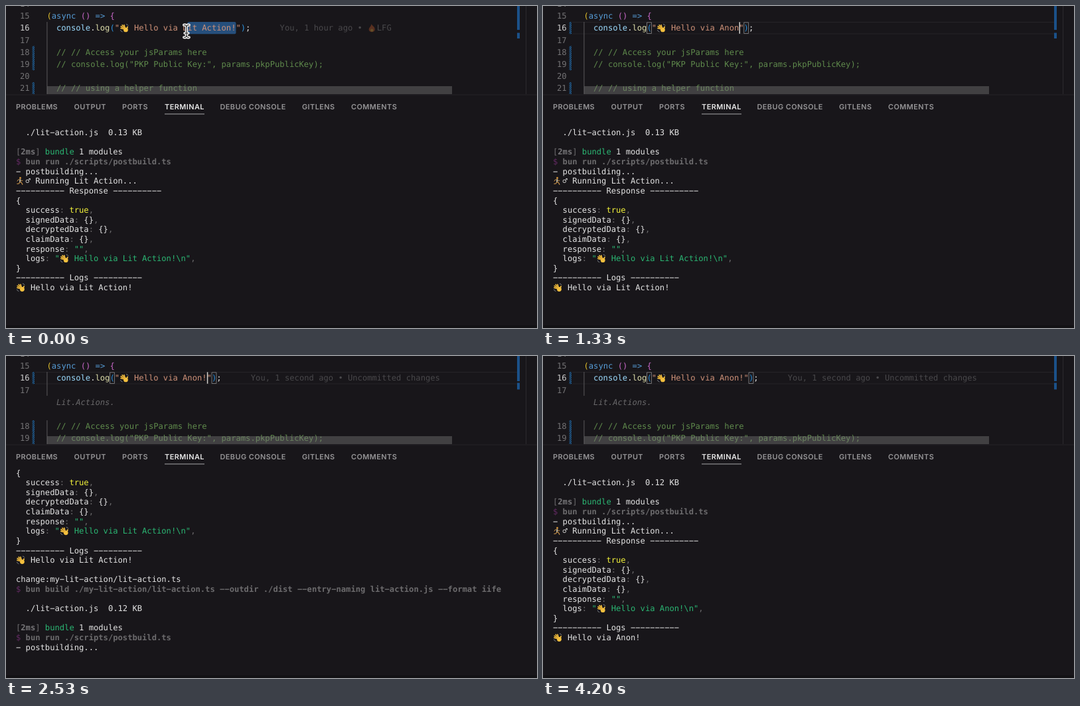
An HTML page with a canvas that plays this animation: 800 px wide and 486 px high, repeating every 4.27 s.

```html
<!DOCTYPE html>
<html lang="en">
<head>
<meta charset="utf-8">
<style>
  html, body { margin: 0; width: 100%; height: 100%; overflow: hidden; background: #18161a; }
  canvas { display: block; }
</style>
</head>
<body>
<canvas id="stage" width="800" height="486"></canvas>
<script>
const ctx = document.getElementById('stage').getContext('2d');
const LOOP = 4270, CELL = 7.31, ROW = 14.61, LINE = 18.2;
const MONO = '12.14px "DejaVu Sans Mono", monospace';
const BG = '#18161a', WHITE = '#e4e4e4', DIM = '#6c6b6d', GREEN = '#2bb673', COMMENT = '#5f8a4c';
const BLUE = '#569cd6', PURPLE = '#c868c8', STRING = '#ce9178', PAREN = '#2c93e0', BLAME = '#49484b';

function rect(x, y, w, h, color) {
  ctx.fillStyle = color;
  ctx.fillRect(x, y, w, h);
}

function stroke(points, width, color) {
  ctx.beginPath();
  points.forEach(([x, y]) => ctx.lineTo(x, y));
  ctx.lineWidth = width;
  ctx.strokeStyle = color;
  ctx.stroke();
}

function dot(x, y, r, color) {
  ctx.beginPath();
  ctx.arc(x, y, r, 0, 7);
  ctx.fillStyle = color;
  ctx.fill();
}

// Small pictograms, each two cells wide
const icons = {
  '👋'() {
    const skin = '#f3bf3e';
    [[1.4, 7], [1.7, 4.3], [3.7, 2.3], [6.4, 2.2]].forEach(tip => stroke([[8.4, 9], tip], 1.7, skin));
    stroke([[9.8, 9.4], [11.6, 5]], 1.8, skin);
    dot(8.9, 9.4, 3.4, skin);
    stroke([[5.8, 8.2], [3.6, 6.4]], .6, '#b57a20');
    stroke([[6.9, 7], [4.9, 4.6]], .6, '#b57a20');
    stroke([[9.6, 1], [11.4, 1.6], [12.4, 3]], .8, '#8b9298');
    stroke([[1, 9.8], [1.8, 11.4], [3.6, 12.4]], .8, '#8b9298');
  },
  '🏃'() {
    stroke([[5.8, 4.8], [5.6, 7.8]], 2, '#aab4b6');
    stroke([[5.2, 4.6], [2.6, 5], [1.6, 6.8]], .9, '#d9a050');
    stroke([[6.4, 4.8], [7.8, 6.8], [9.4, 6]], .9, '#d9a050');
    stroke([[5.8, 8.2], [8, 9.4], [9.4, 12]], 1.1, '#d39a4c');
    stroke([[5.4, 8.2], [4, 10.6], [1.4, 11]], 1.1, '#d39a4c');
    dot(6, 2.2, 1.5, '#d0913a');
  },
  '🔥'() {
    ctx.beginPath();
    ctx.moveTo(6, .5);
    ctx.bezierCurveTo(7, 4, 11, 4, 11, 9);
    ctx.bezierCurveTo(11, 14, 2, 14, 2, 9);
    ctx.bezierCurveTo(2, 6, 5, 5, 6, .5);
    ctx.fillStyle = '#593020';
    ctx.fill();
    dot(6.6, 10.2, 2.1, '#655029');
  }
};

// runs: text, colour, text, colour ...; a leading * in the colour makes it bold, / italic
function write(x, mid, ...runs) {
  for (let i = 0; i < runs.length; i += 2) {
    let color = runs[i + 1], style = '';
    if (color[0] === '*') style = 'bold ';
    if (color[0] === '/') style = 'italic ';
    if (style) color = color.slice(1);
    for (const ch of runs[i]) {
      if (icons[ch]) {
        ctx.save();
        ctx.translate(x + .5, mid - 6.7);
        icons[ch]();
        ctx.restore();
        x += 2 * CELL;
      } else {
        ctx.font = style + MONO;
        ctx.fillStyle = color;
        // The minus sign gives the long hyphen of the look
        ctx.fillText(ch === '-' ? '−' : ch, x, mid + 4.2);
        x += CELL;
      }
    }
  }
}

// Terminal contents
const field = (name, value, color = WHITE) => ['  ' + name, WHITE, ': ', DIM, value, color, ',', DIM];
const plain = text => [text, WHITE];
const command = text => ['$ ', '#642a64', text, '*#6c6b6d'];
const blank = [];
const rule = '-'.repeat(10);

const bundle = size => [
  blank, plain(`  ./lit-action.js  ${size} KB`), blank,
  ['[', DIM, '2ms', '*#777679', '] ', DIM, 'bundle', GREEN, ' 1 modules', WHITE]
];
const post = [command('bun run ./scripts/postbuild.ts'), plain('- postbuilding...')];
const running = [plain('🏃♂ Running Lit Action...')];
const response = name => [
  plain(`${rule} Response ${rule}`),
  plain('{'),
  field('success', 'true', '#f2f23a'),
  field('signedData', '{}'),
  field('decryptedData', '{}'),
  field('claimData', '{}'),
  field('response', '""', GREEN),
  field('logs', `"👋 Hello via ${name}!\\n"`, GREEN),
  plain('}'),
  plain(`${rule} Logs ${rule}`),
  plain(`👋 Hello via ${name}!`),
  blank
];

const output = [
  [0, [...bundle('0.13'), ...post, ...running, ...response('Lit Action')]],
  [1800, [plain('change:my-lit-action/lit-action.ts')]],
  [2200, [command('bun build ./my-lit-action/lit-action.ts --outdir ./dist --entry-naming lit-action.js --format iife'),
          ...bundle('0.12')]],
  [2400, post],
  [3400, running],
  [3470, response('Anon')]
];

function drawTerminal(t) {
  const lines = output.filter(([at]) => t >= at).flatMap(([, rows]) => rows);
  lines.slice(-19).reverse().forEach((runs, i) => write(15, 439.4 - i * ROW, ...runs));
}

const tabs = [['PROBLEMS', 15], ['OUTPUT', 102.5], ['PORTS', 175], ['TERMINAL', 239],
              ['DEBUG CONSOLE', 322.5], ['GITLENS', 446], ['COMMENTS', 520]];

function drawPanel(t) {
  rect(0, 133, 800, 353, BG);
  rect(0, 133.5, 800, 1, '#242226');
  ctx.font = '600 10.9px Inter, sans-serif';
  ctx.letterSpacing = '0.45px';
  for (const [name, x] of tabs) {
    ctx.fillStyle = name === 'TERMINAL' ? '#e7e7e7' : '#969597';
    ctx.fillText(name, x, 155.5);
  }
  ctx.letterSpacing = '0px';
  rect(239, 162.5, 60, 1, '#a8a8aa');
  drawTerminal(t);
  rect(0, 482, 800, 4, '#121114');
}

// Editor
const keys = [800, 930, 1070, 1270, 1500];
const lineY = n => 15 + (n - 15) * LINE;

function hatch(mid) {
  ctx.save();
  ctx.beginPath();
  ctx.rect(39.6, mid - 9.1, 3.4, LINE);
  ctx.clip();
  for (let y = mid - 14; y < mid + 12; y += 2.9) stroke([[39, y + 5], [44, y]], 1.1, '#2069a6');
  ctx.restore();
}

function bracketBox(x) {
  ctx.lineWidth = 1;
  ctx.strokeStyle = '#777678';
  ctx.strokeRect(x + .5, 24.8, CELL - .8, 16.7);
}

function beam(x, y) {
  for (const [w, color] of [[4.2, '#f8f8f8'], [1.1, '#1a1a1a']]) {
    for (const side of [-1, 1]) {
      const end = y + side * 9.3;
      const neck = y + side * 7.2;
      stroke([[x - 3.8, end], [x - 1.5, end], [x, neck], [x + 1.5, end], [x + 3.8, end]], w, color);
    }
    stroke([[x, y - 7.2], [x, y + 7.2]], w, color);
    stroke([[x - 2.5, y + 3], [x + 2.5, y + 3]], w, color);
  }
}

function drawEditor(t) {
  const typed = keys.filter(at => t >= at).length;
  const editing = typed > 0;
  const ghost = t >= 1730;
  const word = editing ? 'Anon!'.slice(0, typed) : 'Lit Action!';
  const start = 76 + 26 * CELL, end = start + word.length * CELL;
  const shift = n => lineY(n) + (ghost && n > 17 ? 2 * LINE : 0);

  if (editing) {
    rect(44, 24, 730, 1, '#252327');
    rect(44, 41.5, 730, 1, '#252327');
  }
  rect(61.4, 24, 1, ghost ? 36 : 110, '#5a595b');
  if (ghost) rect(61.4, 97, 1, 37, '#5a595b');

  for (let n = 14; n < 22; n++) {
    write(21, shift(n), String(n), n === 16 ? '#d0d0d0' : '#747375');
    if (n === 18 || n === 19 || n === 21 || (n === 16 && editing)) hatch(shift(n));
  }

  if (!editing) {
    const left = t < 70 ? start + CELL : start;
    ctx.beginPath();
    ctx.roundRect(left, 24, end - left, LINE, 2);
    ctx.fillStyle = '#264f7c';
    ctx.fill();
  }

  write(61.5, lineY(15), '(', '#e3c22c', 'async ', BLUE, '()', PURPLE, ' => ', BLUE, '{', PURPLE);
  if (editing) {
    bracketBox(76 + 11 * CELL);
    bracketBox(end + CELL);
  }
  write(76, lineY(16), 'console', '#9cdcfe', '.', WHITE, 'log', '#dcdcaa', '(', PAREN,
    `"👋 Hello via ${word}"`, STRING, ')', PAREN, ';', WHITE);
  if (!editing) write(412.6, lineY(16), 'You, 1 hour ago • 🔥LFG', BLAME);
  if (t >= 2470) write(368.8, lineY(16), 'You, 1 second ago • Uncommitted changes', BLAME);
  if (ghost) write(76, lineY(18), 'Lit.Actions.', '/#69686a');
  write(76, shift(18), '// // Access your jsParams here', COMMENT);
  write(76, shift(19), '// console.log("PKP Public Key:", params.pkpPublicKey);', COMMENT);
  write(76, shift(21), '// // using a helper function', COMMENT);

  // The caret restarts its blink at each key
  const since = t - (editing ? keys[typed - 1] : 70);
  const on = editing ? since % 1000 < 500 : since >= 0;
  if (on) rect((editing ? end : start) + .2, 24.3, 1.5, 17.5, '#d0d0cc');

  rect(62, 121, 610, 12, 'rgba(121,121,121,.42)');
  rect(783, 0, 1, 134, '#2c2a2e');
  rect(770, 0, 4, ghost ? 38 : 36, '#1b5189');
  rect(770, 40.5, 4, ghost ? 10 : 8.5, '#1b5189');

  if (t >= 470 && !editing) {
    ctx.beginPath();
    ctx.roundRect(163.5, -10, 135, 15.5, 2);
    ctx.fillStyle = '#1d1b1f';
    ctx.fill();
    ctx.lineWidth = 1;
    ctx.strokeStyle = '#3c3b3e';
    ctx.stroke();
  }
  if (!editing) {
    const p = Math.min(1, Math.max(0, (t - 200) / 330));
    const ease = p * p * (3 - 2 * p);
    const back = 4 * Math.min(1, t / 130);
    beam(272 - back + (12 + back) * ease, 38 + 6.5 * ease);
  }
}

const begin = performance.now();
function frame() {
  const t = (performance.now() - begin) % LOOP;
  ctx.lineCap = ctx.lineJoin = 'round';
  ctx.textRendering = 'geometricPrecision';
  rect(0, 0, 800, 486, BG);
  drawEditor(t);
  drawPanel(t);
  requestAnimationFrame(frame);
}
frame();
</script>
</body>
</html>
```
